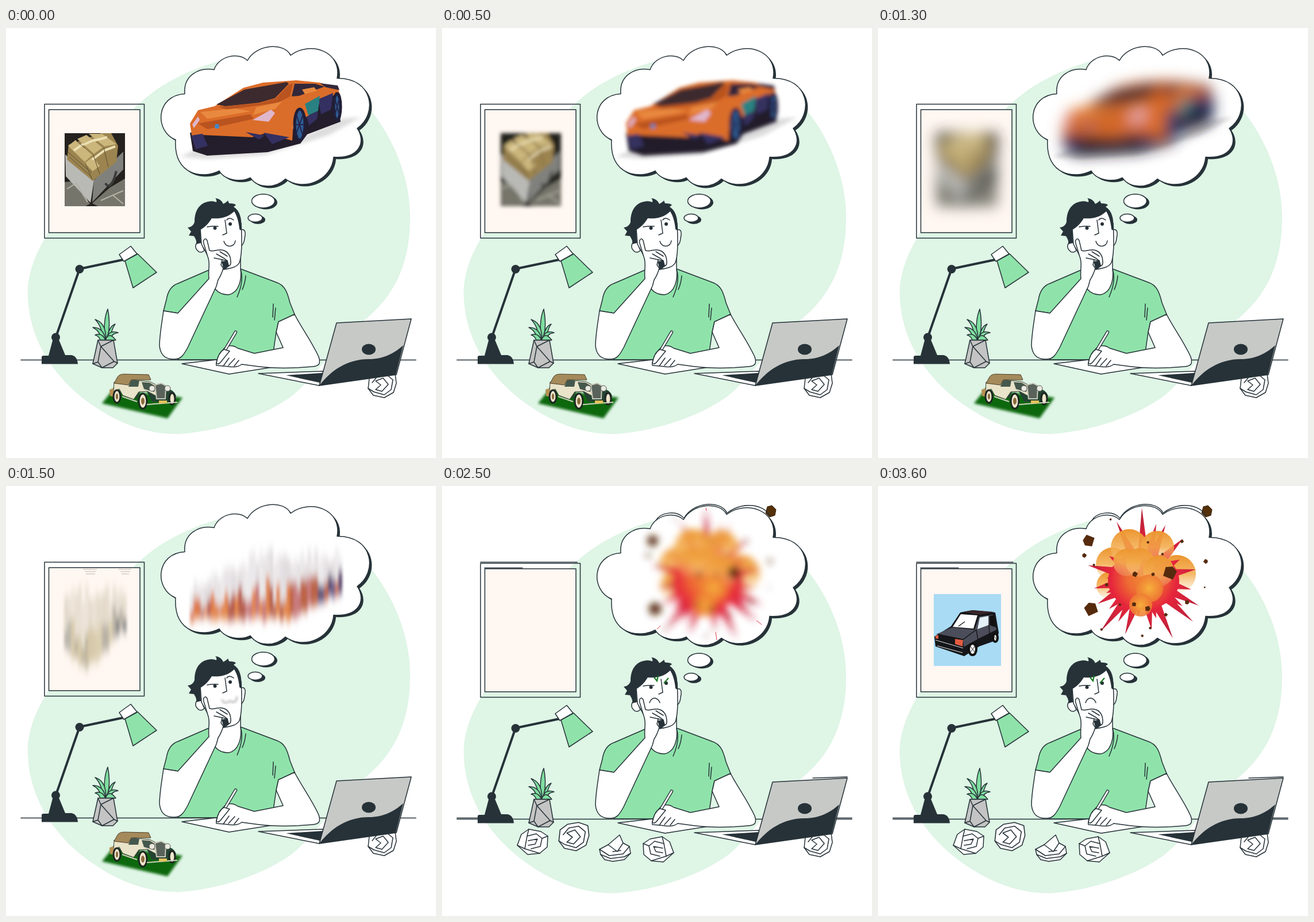
Animation of 748x748 px, one loop 4000 ms. Source, as an HTML page:

```html
<!DOCTYPE html>
<html lang="en">
<head>
<meta charset="utf-8">
<title>Daydream at the desk</title>
<style>
html, body { margin: 0; width: 100%; height: 100%; overflow: hidden; background: #fff }
svg { display: block; width: 100vw; height: 100vh }
.ln { stroke: #263238; stroke-width: 1.5; stroke-linejoin: round; stroke-linecap: round }
.no { fill: none }
</style>
</head>
<body>
<svg viewBox="0 0 748 748">
<defs>
  <filter id="soft" x="-20%" y="-20%" width="140%" height="140%"><feGaussianBlur stdDeviation="2"/></filter>
  <filter id="blur1" x="-20%" y="-20%" width="140%" height="140%"><feGaussianBlur stdDeviation="3.2"/></filter>
  <filter id="blur2" x="-30%" y="-40%" width="160%" height="180%"><feGaussianBlur stdDeviation="12"/></filter>
  <filter id="blur3" x="-20%" y="-20%" width="140%" height="140%"><feGaussianBlur stdDeviation="6.5"/></filter>
  <filter id="streak" x="-10%" y="-20%" width="120%" height="140%"><feGaussianBlur stdDeviation="2 9"/></filter>
  <linearGradient id="puff" x2="0" y2="1">
    <stop stop-color="#ec9530"/><stop offset=".5" stop-color="#f3ab4a" stop-opacity=".85"/><stop offset="1" stop-color="#f8cf94" stop-opacity=".2"/>
  </linearGradient>
  <radialGradient id="fire"><stop stop-color="#f6b13c"/><stop offset="1" stop-color="#ee7a33" stop-opacity=".85"/></radialGradient>
  <radialGradient id="ray" gradientUnits="userSpaceOnUse" cx="462" cy="160" r="115">
    <stop stop-color="#f08a35"/><stop offset=".25" stop-color="#ee6a33"/><stop offset=".5" stop-color="#e6253c"/><stop offset="1" stop-color="#b3203a"/>
  </radialGradient>
  <path id="cloud" d="M296 194C259 179 261 117 312 114C309 82 337 67 363 72C371 48 405 41 421 56C437 27 485 24 496 47C530 21 586 40 577 87C640 86 648 149 612 174C629 200 613 227 571 224C568 264 519 285 487 262C470 279 439 279 426 260C411 268 381 265 372 248C346 262 292 258 296 194Z"/>
  <g id="ball" class="ln">
    <path fill="#fff" d="M-27 6L-20-13L-7-22L14-18L26-10L25 9L12 20L-9 22Z"/>
    <path class="no" d="M-27 6L-14 12L12 20M-14 12L-10-10L6-14L16-6L13 8L-3 12M-8-2L8-5L4 4L-8 6M-7-22L-10-10M26-10L16-6"/>
  </g>
  <g id="round" class="ln">
    <path fill="#fff" d="M-24 6L-22-12L-10-21L8-24L23-19L25-3L20 13L4 22L-15 18Z"/>
    <path class="no" d="M-24 6L-14 12L4 17L16 8L19-9L8-18L-8-15L-17-4M-11-7L2-12L11-1L0 11L-11 8L-2 0Z"/>
  </g>
  <g id="wad" class="ln">
    <path fill="#fff" d="M-25 10L-27 1L-12-7L8-24L14-10L25-4L27 8L16 19L-4 22L-18 19Z"/>
    <path class="no" d="M-12-7L4 5L14-10M-27 1L-10 12L14 9L25-4M-25 10L-8 17L16 14L27 8M-4 5L10 3"/>
  </g>
</defs>

<g id="scene">
  <path fill="#dff5e6" d="M385 54C300 75 240 115 205 160C150 230 115 270 70 362C44 405 36 440 38 470C42 545 83 609 150 656C205 694 255 708 305 706C375 701 455 673 500 638C545 600 570 550 625 507C668 472 703 420 703 330C703 255 670 185 630 138Z"/>

  <!-- picture frame -->
  <path class="ln no" d="M67 132.500H240.500V365.500H67Z"/>
  <path class="ln" fill="#fff7f1" d="M74.500 142H233V356H74.500Z"/>

  <!-- thought cloud -->
  <g transform="translate(-1 .5)">
    <use href="#cloud" x="4" y="3.500" fill="#263238"/>
    <use href="#cloud" class="ln" fill="#fff"/>
    <g fill="#263238"><ellipse cx="453" cy="303" rx="20" ry="12"/><ellipse cx="439" cy="333" rx="13" ry="7.500"/></g>
    <g class="ln" fill="#fff"><ellipse cx="448.500" cy="300.500" rx="20" ry="12"/><ellipse cx="434.500" cy="330" rx="12.500" ry="7"/></g>
  </g>

  <path class="ln" d="M26 577.500H713"/>

  <!-- lamp -->
  <g fill="#263238">
    <path d="M62 584.500V573Q62 570 65 570H74L82 540H91L103 569H114Q124 571 125 584.500Z"/>
    <circle cx="86.500" cy="538" r="7.500"/><circle cx="128" cy="419.500" r="7.500"/>
    <path fill="none" stroke="#263238" stroke-width="4" d="M87 537L128 419L204 403"/>
  </g>
  <path class="ln" fill="#8fe3aa" d="M207 405L229 393L262 425L221 452Z"/>
  <path class="ln" fill="#fff" d="M197 394L217 379.500L228 393L205 406Z"/>

  <!-- plant -->
  <g class="ln" fill="#7fdd9f">
    <path d="M171 543C171 525 170 505 177 489C181 510 180 525 176 543Z"/>
    <path d="M168 543C168 525 163 515 155 507C170 512 174 525 174 543ZM176 543C177 525 184 517 190 515C184 522 183 532 180 543Z"/>
    <path d="M166 543C164 531 158 524 151 521C164 520 172 530 173 543ZM175 543C176 530 184 526 195 530C186 531 182 536 181 543Z"/>
    <path d="M164 543Q161 535 155 534Q167 529 173 543ZM173 543Q179 527 191 543Z"/>
  </g>
  <path class="ln" fill="#c3c4c3" d="M160 543H187L194 583L186 591H167L151 584Z"/>
  <path class="ln no" d="M160 543L165 554L187 543M165 554L160 581L151 584M160 581L167 591M165 554L188 580L194 583M188 580L167 591"/>

  <!-- shirt and neck -->
  <path class="ln" fill="#8fe3aa" d="M353 421L300 444C287 448 281 460 279 473L274 492L299 496V577H463L470 529L474 511L502 498L494 478C490 462 486 447 469 442L408 419Z"/>
  <path class="ln" fill="#fff" d="M372 405L364 454Q372 464 387 464C404 461 411 440 408 417V400Z"/>
  <path class="ln no" d="M408 420C413 435 409 452 402 468M417 431Q416 444 411 455M465 480L464 503M469 487L467 508"/>

  <!-- head -->
  <path class="ln" fill="#fff" d="M409 351C417 349 417 357 415 366Q414 376 409 379Z"/>
  <path class="ln" fill="#fff" d="M339 372C330 370 327 381 333 387C337 392 342 390 345 387Z"/>
  <path class="ln" fill="#fff" d="M338 350L340 376L354 402L378 420C392 418 402 416 406 408C410 397 411 375 409 340L395 312L355 322Z"/>
  <path fill="#263238" d="M339 374L331 376C332 369 329 366 327 362L318 361L322 354L316 347C321 347 327 343 328 337C328 315 339 304 352 302Q359 300 366 303Q367 299 364 296Q374 297 378 306Q385 302 386 300L388 305Q398 305 400 308L396 311C407 318 411 332 409 352L406 350C405 338 402 327 397 319C385 331 370 332 358 331C352 341 344 348 338 351Z"/>
  <g fill="#263238"><circle cx="363.500" cy="348" r="3"/><circle cx="390" cy="341" r="3"/></g>
  <path class="ln no" d="M381 334L384 357L377 360M350 346Q360 344 369 345"/>
  <path data-on="01234" class="ln no" d="M384 334Q388 328 396 334"/>
  <path data-on="012" class="ln no" d="M379 371C382 383 398 382 399 370"/>
  <path data-on="34" fill="none" stroke="#aaa" stroke-width="2.500" filter="url(#soft)" d="M376 371Q378 380 386 376Q391 372 394 376Q401 377 402 366"/>
  <g data-on="56" class="no">
    <path class="ln" d="M361 375Q364 366 371 367Q377 369 379 375"/>
    <path stroke="#187a22" stroke-width="2.200" d="M369 331L374 337L376 328M386 341L394 332"/>
  </g>

  <!-- raised arm and hand -->
  <path fill="#263238" d="M375 406L391 404L389 414L379 421Z"/>
  <path class="ln" fill="#fff" d="M274 492L299 496L353 436C351 420 356 410 351 398L344 375C342 367 348 364 350 370L354 387C363 390 369 383 379 387C387 390 391 397 391 408Q391 414 387 413L385 405L376 403L374 412L378 418Q374 431 369 438L366 449L316 556C309 569 304 576 294 576C280 577 269 571 267 553C267 535 271 514 274 492Z"/>
  <path class="ln no" d="M372 389L385 397M366 393L380 401L385 405M362 400L376 403"/>

  <!-- paper, writing arm, pen -->
  <path class="ln" fill="#fff" d="M306 584L366 577L470 589L388 602Z"/>
  <path class="ln" fill="#fff" d="M474 511L502 498C514 522 530 542 544 572C548 585 544 588 533 589C500 592 465 592 440 589L410 585C400 593 386 588 378 588L366 587C364 580 373 565 378 559C386 550 396 552 403 557L432 566L482 556L470 529Z"/>
  <path class="ln no" d="M378 588L388 574M387 587L398 575M397 588L405 578"/>
  <path fill="none" stroke="#263238" stroke-width="5.500" stroke-linecap="round" d="M375 570L399.500 529"/>
  <path fill="none" stroke="#fff" stroke-width="2.800" stroke-linecap="round" d="M375 570L399.500 529"/>
  <path class="ln" fill="#fff" d="M366 583Q369 565 379 559L389 562L376 578Q370 587 366 583Z"/>

  <!-- laptop and crumpled paper -->
  <use href="#round" x="654" y="621"/>
  <path class="ln" fill="#fff" d="M439 601L552 597L545 622Z"/>
  <path fill="#263238" d="M487 604L551 600L546 617Z"/>
  <path class="ln" fill="#c7c9c6" d="M575 513L705 506L679 603L545 622Z"/>
  <path fill="#263238" d="M545 622C566 595 594 576 631 576C657 576 675 566 691 552L678 603Z"/>
  <ellipse cx="631" cy="559" rx="12" ry="9.500" fill="#263238"/>
  <g data-on="56">
    <use href="#ball" x="158" y="617"/>
    <use href="#round" transform="translate(229 609) scale(1.07)"/>
    <use href="#wad" x="301" y="629"/>
    <use href="#ball" transform="translate(376 630) scale(-1 1)"/>
  </g>
</g>

<!-- toy car on the desk -->
<g data-on="01234">
  <path fill="#08680a" filter="url(#soft)" d="M187 628L307 643L281 679L167 653Z"/>
  <path fill="#244332" d="M180 638Q184 625 198 627L215 637L229 645Q231 628 244 630L254 650L290 650L296 640Q291 627 278 628L240 616L190 620Z"/>
  <path fill="#e9e3c9" stroke="#39463c" d="M188 616L214 617L218 612L250 615L264 622L261 640L246 632L231 633L222 646L203 639L197 628L187 633Z"/>
  <path fill="#a58a5b" stroke="#4b4029" d="M194 607Q197 602 206 602L248 603L252 612H218L213 621L188 618Z"/>
  <path fill="#45584d" d="M217 613L232 613L230 624L213 624ZM236 616L250 617L260 623L258 633L240 628Z"/>
  <path fill="#b69053" d="M180 629L187 627L188 642L181 640Z"/>
  <g fill="#eee6cc" stroke="#1d2521" stroke-width="3">
    <ellipse cx="193" cy="641" rx="6" ry="11"/><ellipse cx="238" cy="649" rx="7" ry="13"/><ellipse cx="289" cy="645" rx="5" ry="10"/>
  </g>
  <g fill="#8a6a3f"><ellipse cx="193" cy="641" rx="2" ry="5"/><ellipse cx="238" cy="649" rx="3" ry="6"/></g>
  <path fill="#59625b" stroke="#c9c9b8" stroke-width="2" d="M259 621L270 618L278 622L277 645H262Z"/>
  <g fill="#e9eadf" stroke="#555"><circle cx="254" cy="627" r="5"/><circle cx="281" cy="627" r="5"/></g>
  <path fill="none" stroke="#cfcfbd" stroke-width="2" d="M245 655L298 651M202 641L228 650"/>
  <path fill="#e4c25c" d="M266 648H280V653H266Z"/>
</g>

<!-- case of cash -->
<g id="cash" data-on="012">
  <path fill="#24211e" d="M102 183H207V310H102Z"/>
  <path fill="#76756b" d="M102 268L122 266L146 306L138 310H102ZM150 305L180 278L207 262V310H160Z"/>
  <path fill="#b9b9b6" d="M103 220L153 265L147 304L104 258Z"/>
  <path fill="#80817d" d="M153 265L204 215V246L150 303Z"/>
  <path fill="#9c8450" d="M109 203L166 183H183L195 205L192 233L151 266L106 229Z"/>
  <path fill="#cbb67c" d="M108 205L121 195L150 221L137 233ZM124 193L140 186L168 208L153 219ZM144 184H167L192 202L171 206ZM137 235L151 224L163 240L151 249Z"/>
  <path fill="none" stroke="#ece0b4" stroke-width="4" d="M118 213L134 202M135 203L155 194M153 196L176 190M150 229L171 213L190 206"/>
  <path fill="none" stroke="#5d4f31" d="M138 235L150 264M152 221L163 254M170 208L178 242M122 196L137 209M108 216L149 252M110 224L149 259"/>
  <path fill="none" stroke="#3b3b39" stroke-width="4" d="M173 270Q180 282 188 262L192 249"/>
  <path fill="none" stroke="#b3b2a5" stroke-width="2" d="M106 280L122 270L142 303M165 300L204 283M186 291L204 306"/>
</g>

<!-- dream car -->
<path data-on="012" fill="#ddd" filter="url(#blur1)" d="M303 224L330 211L500 196L582 158L618 155L560 187L450 221L350 228Z"/>
<g id="car" data-on="012">
  <path fill="#241d2b" d="M320 182L500 175L515 125L575 112L582 163L524 185L512 201L455 216L350 222L325 214Z"/>
  <path fill="#db6d2a" d="M320 166L334 143L363 136L413 104L447 95L505 91L546 95L578 107L583 122L570 117L540 135L524 156L514 148L500 164L498 196L452 183L428 190L340 186L324 193Z"/>
  <path fill="#3d2a2f" d="M366 133L415 107L455 100L488 94L492 97L468 122L440 130L382 136Z"/>
  <path fill="#33283a" d="M502 97L538 97L554 102L510 118L497 119ZM546 96L577 100L580 108L556 103Z"/>
  <path fill="#b9531f" d="M369 137L440 131L469 123L492 99L499 96L494 119L473 130L385 142ZM334 166L425 150L431 158L350 176Z"/>
  <path fill="#e9893f" d="M338 146L400 140L425 145L350 158ZM435 138L480 128L468 141L430 151ZM515 107L536 103L541 109L520 115Z"/>
  <path fill="#dfb7cc" d="M429 160L461 142L468 148L457 163ZM324 168L334 154L337 160L327 174Z"/>
  <path fill="#343061" d="M322 187L342 184L351 205L330 211ZM417 181L450 187L440 194ZM448 182L493 190L463 202ZM543 124L569 113L565 142L548 150ZM523 154L543 144L541 158L527 170Z"/>
  <path fill="#298181" d="M520 132L546 118L543 144L526 152Z"/>
  <g fill="#2d5d94" stroke="#211e38" stroke-width="5"><ellipse cx="511" cy="168" rx="9" ry="27"/><ellipse cx="576" cy="137" rx="6" ry="23"/></g>
  <path fill="none" stroke="#25244a" stroke-width="2" d="M505 150L516 186M517 150L504 186M503 168H519M572 122L580 152M580 122L572 152"/>
  <circle cx="367" cy="171" r="4" fill="#4386c6"/>
</g>

<!-- both pictures running down -->
<g data-on="3"><g id="drips" filter="url(#streak)"></g></g>

<!-- their last traces -->
<g data-on="4">
  <g filter="url(#blur1)">
    <path fill="#f1ebea" d="M313 208C350 236 410 222 455 222C520 218 565 190 578 111Q610 100 622 130C620 165 610 205 575 216C540 250 445 258 380 244L330 242Z"/>
    <path fill="#e8dedd" d="M443 238Q455 230 470 239Q460 249 443 238ZM527 243Q532 230 547 232Q545 246 527 243ZM555 205L588 185L580 207Z"/>
    <path fill="#c3bdbe" d="M312 216L330 219L348 232L372 244L346 243L321 233Z"/>
  </g>
  <g filter="url(#soft)">
    <path fill="#fbefe2" d="M133 205L143 205L151 270Q180 285 196 260L204 205L219 260Q213 300 187 318L127 323Q98 308 98 280Z"/>
    <path fill="#e3d9cd" d="M99 290Q112 275 125 290Q145 302 170 300L200 290Q190 311 168 309Q140 327 120 318Q102 310 99 290Z"/>
    <path fill="#d5cdc2" d="M104 291L120 290L139 315L122 314Z"/>
  </g>
</g>
<path data-on="34" fill="none" stroke="#bbb6b1" d="M134 145H158M137 149H156M139 153H155M196 145H218M199 149H216M201 153H214"/>

<!-- explosion -->
<g data-on="56"><g id="blast"></g></g>
<g data-on="56">
  <path fill="#543109" stroke="#35200a" d="M566 36L574 34L581 41L579 51L570 54L563 47Z"/>
  <path class="ln no" d="M372 60C380 46 407 41 421 56C437 27 485 24 496 47C525 25 560 33 570 51M67 132.500H235M74 142.500H140M26 577.500H62M686 577.500H713M645 508L705 506"/>
</g>
<path data-on="5" stroke="#e2384a" fill="none" d="M374 249L380 243M476 254L478 268M547 234L556 241M459 38L460 43"/>

<!-- small car in the frame -->
<g data-on="6">
  <path fill="#a9dbf4" d="M97 188H214V313H97Z"/>
  <path fill="#15161a" d="M98 262L127 244L143 220L164 216L204 220L210 255L207 268L176 279L150 296L100 279Z"/>
  <path fill="#4b4e5a" d="M101 258L129 246L168 250L176 227L200 224L206 250L174 266L149 280L148 267Z"/>
  <path fill="#382629" d="M148 219L165 216L202 219L176 224Z"/>
  <path fill="#fff" d="M130 245L144 223L173 225L166 248Z"/>
  <path fill="#e4f1f7" d="M177 229L192 226V242L173 249Z"/>
  <path fill="#111" d="M194 226L201 225L205 246L194 242Z"/>
  <path fill="none" stroke="#111" stroke-width="1.300" d="M171 250L174 268M193 242L194 258M104 258L148 267L171 250M140 244L151 236"/>
  <path fill="#e45c40" d="M134 266L148 268L147 279L134 275ZM100 261L105 259V266L100 265Z"/>
  <path fill="none" stroke="#e5e5e5" d="M100 268L148 282M103 278L147 290"/>
  <g fill="#f4f4f4" stroke="#111" stroke-width="4"><ellipse cx="164.500" cy="284" rx="6.500" ry="10"/><ellipse cx="204" cy="264" rx="4" ry="7"/></g>
  <path fill="none" stroke="#333" d="M160 278L169 290M169 278L160 290M201 260L207 268"/>
</g>
</svg>

<script>
const $ = id => document.getElementById(id);
const mid = [462, 160];

let seed = 7;
const rand = () => (seed = seed * 16807 % 2147483647) / 2147483647;

// Vertical streaks: a pale tall bar and a shorter coloured one below it
function drips(x0, x1, top, base, colors, pale, dense) {
  let out = '';
  for (let x = x0; x < x1; x += 6) {
    const k = (x - x0) / (x1 - x0), b = base(k) - 10 * rand(), t = top(k) + 30 * rand();
    const h = (b - t) * (.25 + .4 * rand());
    const color = colors[Math.min(colors.length - 1, Math.floor(k * colors.length * .7 + rand() * colors.length * .3))];
    const bar = (y, c, o) => `<path fill="${c}" opacity="${o}" d="M${x} ${y}H${x + 7}V${b}H${x}Z"/>`;
    out += bar(t, pale, .35 + .35 * rand()) + bar(b - h, color, dense);
  }
  return out;
}

// Thin spike from the middle to a tip
function spike([x, y]) {
  const a = Math.atan2(y - mid[1], x - mid[0]);
  const at = d => `${mid[0] + 45 * Math.cos(a + d)},${mid[1] + 45 * Math.sin(a + d)}`;
  return `<polygon fill="url(#ray)" points="${at(-.19)} ${x},${y} ${at(.19)}"/>`;
}

const puff = (x, y, r, fill = 'puff') => `<circle cx="${x}" cy="${y}" r="${r}" fill="url(#${fill})"/>`;

const chunk = ([x, y, r]) => {
  const pts = [0, 1, 2, 3, 4].map(k => {
    const a = k * 1.257 + x, d = r * (.82 + .25 * Math.sin(k * 5 + y));
    return `${x + d * Math.cos(a)},${y + d * Math.sin(a)}`;
  });
  return `<polygon fill="#562b0d" points="${pts.join(' ')}"/>`;
};

const tips = [[459, 38], [484, 66], [500, 68], [530, 92], [525, 128], [553, 145], [545, 180], [558, 208],
  [530, 209], [548, 236], [513, 265], [484, 230], [476, 250], [452, 226], [430, 258], [418, 236],
  [387, 253], [402, 214], [382, 205], [397, 186], [376, 178], [398, 160], [365, 138], [402, 122], [415, 62]];
const chunks = [[364, 96, 13], [358, 121, 5], [370, 211, 15], [509, 148, 15], [446, 153, 6],
  [571, 131, 5], [538, 203, 5], [446, 205, 5], [470, 214, 6], [398, 171, 4], [478, 153, 4],
  [528, 96, 4], [469, 98, 3], [405, 58, 2.5], [376, 137, 3], [568, 176, 2], [389, 249, 3],
  [500, 224, 4], [474, 247, 3], [460, 260, 3], [495, 118, 3], [421, 207, 3]];

$('blast').innerHTML =
  puff(408, 136, 29) + puff(520, 153, 33) + puff(404, 173, 24) + tips.map(spike).join('') +
  `<ellipse cx="${mid[0]}" cy="${mid[1] + 5}" rx="62" ry="50" fill="url(#ray)"/>` +
  puff(437, 107, 32) + puff(486, 107, 29) + puff(456, 133, 25) + puff(488, 148, 27) + puff(433, 133, 24) +
  puff(472, 178, 24, 'fire') + puff(457, 207, 20, 'fire') + chunks.map(chunk).join('');

$('drips').innerHTML =
  drips(320, 580, k => 160 - 55 * Math.min(1, k * 2.2), k => 236 - 50 * Math.max(0, k * 3 - 2),
    ['#d9602c', '#dd6a2b', '#b04a35', '#e0752f', '#c46a6a', '#b5502f', '#4a3560', '#5a4a78'], '#d5cfd2', .85) +
  drips(101, 206, () => 172, k => 285 + 33 * Math.sin(k * 4.4),
    ['#aaa79f', '#b3a88c', '#d0c19a', '#d8c9a6', '#a8a294', '#60666b'], '#d9cfbd', .7);

const layers = document.querySelectorAll('[data-on]');
const fx = ['', 'blur1', 'blur2'];
const setFx = (el, id) => id ? el.setAttribute('filter', `url(#${id})`) : el.removeAttribute('filter');
let last = -1;

function draw(now) {
  const step = Math.min(6, Math.floor(now % 4000 / 500));
  if (step !== last) {
    last = step;
    layers.forEach(el => el.style.display = el.dataset.on.includes(step) ? '' : 'none');
    $('scene').setAttribute('transform', `translate(0 ${step > 4 ? 2 : 0})`);
    setFx($('car'), fx[step]);
    setFx($('cash'), fx[step]);
    setFx($('blast'), step === 5 && 'blur3');
  }
  requestAnimationFrame(() => draw(performance.now()));
}
draw(performance.now());
</script>
</body>
</html>
```
